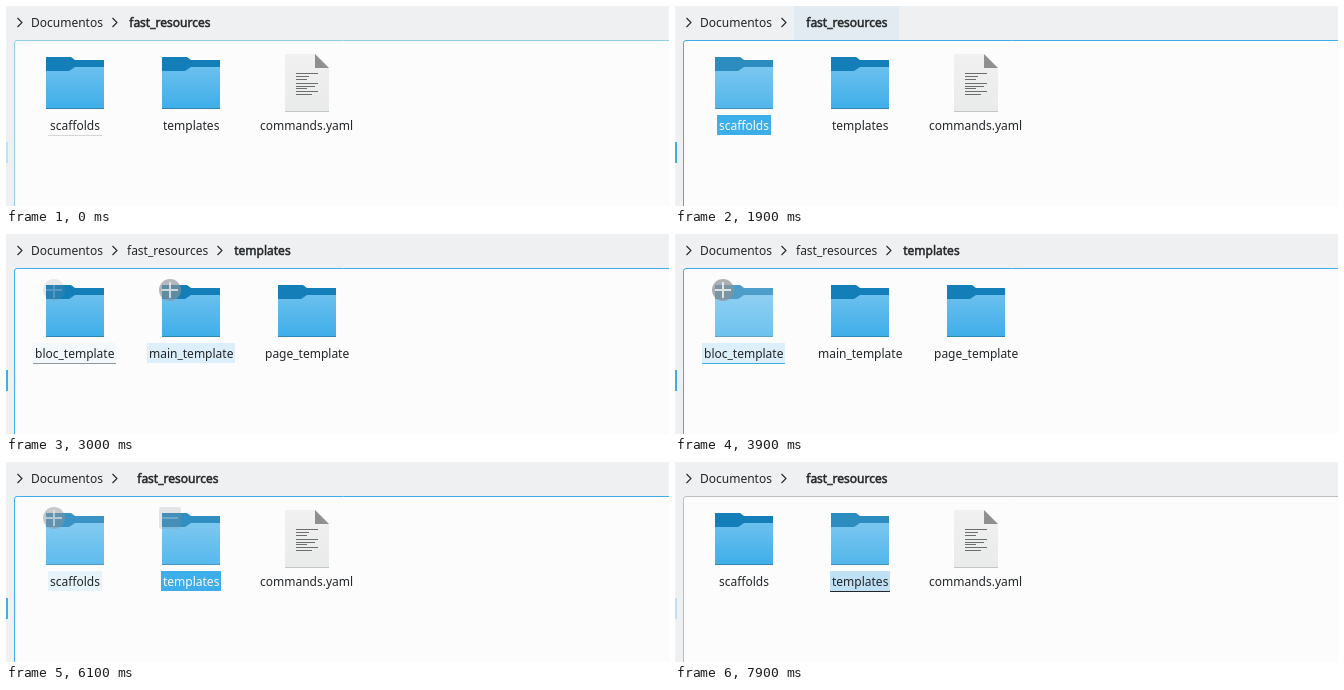
Recreate the animation shown at these times as an HTML page with a canvas. Size 663 px wide and 200 px high, loop 8 s.

```html
<!DOCTYPE html>
<html lang="es">
<head>
<meta charset="utf-8">
<title>File browser</title>
<style>
html, body { margin: 0; width: 100%; height: 100%; overflow: hidden; background: #eff0f1; }
canvas { display: block; width: 663px; height: 200px; }
</style>
</head>
<body>
<canvas id="stage" width="663" height="200"></canvas>
<script>
const ctx = document.getElementById('stage').getContext('2d');
const LOOP = 8000, STEP = 100;
const INK = '#232629', BLUE = '#3daee9';
const CENTERS = [69, 185, 301, 417];
const FONT = '12px "Noto Sans", "Open Sans", sans-serif';

const ramp = (t, a, b) => Math.min(1, Math.max(0, (t - a) / (b - a)));
const pulse = (t, a, b, c, d) => Math.min(ramp(t, a, b), 1 - ramp(t, c, d));
const mix = (a, b, k) => 'rgb(' + a.map((v, i) => Math.round(v + (b[i] - v) * k)) + ')';

function poly(points, fill) {
  ctx.beginPath();
  points.forEach(([x, y]) => ctx.lineTo(x, y));
  ctx.closePath();
  ctx.fillStyle = fill;
  ctx.fill();
}

function rect(x, y, w, h, fill) {
  ctx.fillStyle = fill;
  ctx.fillRect(x, y, w, h);
}

function gradient(y0, y1, from, to) {
  const g = ctx.createLinearGradient(0, y0, 0, y1);
  g.addColorStop(0, from);
  g.addColorStop(1, to);
  return g;
}

function folder(c, light) {
  const x = c - 29;
  const back = [[x, 51], [x + 25, 51], [x + 29, 54], [x + 58, 54], [x + 58, 103], [x, 103]];
  poly(back, '#147eb8');
  poly([[x, 65], [x + 23, 65], [x + 29, 61], [x + 58, 61], [x + 58, 103], [x, 103]],
    gradient(61, 103, '#6bc0ee', '#3eaee9'));
  rect(x, 102, 58, 1, '#2f86b5');
  if (light) poly(back, `rgba(255,255,255,${light})`);
}

function file(c, light) {
  const x = c - 22;
  const body = [[x, 48], [x + 30, 48], [x + 44, 62], [x + 44, 106], [x, 106]];
  poly(body, gradient(48, 106, '#f1f1f1', '#e9eaea'));
  rect(x, 105, 44, 1, '#c3c4c5');
  poly([[x + 30, 48], [x + 44, 62], [x + 30, 62]], '#8e8f91');
  const lines = [[67, 22], [70, 13], [73, 11], [77, 22], [80, 19], [82, 11], [85, 22], [88, 16]];
  lines.forEach(([y, w]) => rect(x + 11, y, w, 1, '#6b6d6f'));
  if (light) poly(body, `rgba(255,255,255,${light})`);
}

// Selection toggle: round plus, or square minus on selected items
function toggle(c, alpha, selected) {
  if (alpha <= 0) return;
  const x = c - 21, y = 56;
  ctx.save();
  ctx.globalAlpha = alpha;
  ctx.fillStyle = 'rgba(140,146,149,.72)';
  ctx.beginPath();
  if (selected) ctx.roundRect(x - 11, y - 11, 22, 22, 3);
  else ctx.arc(x, y, 11, 0, Math.PI * 2);
  ctx.fill();
  rect(x - 8, y - 1, 16, 2, 'rgba(240,241,242,.85)');
  if (!selected) {
    rect(x - 1, y - 8, 2, 7, 'rgba(240,241,242,.85)');
    rect(x - 1, y + 1, 2, 7, 'rgba(240,241,242,.85)');
  }
  ctx.restore();
}

function item(index, { name, hover = 0, glow = hover, mark = hover, selected, line }, active) {
  const c = CENTERS[index];
  const w = ctx.measureText(name).width;
  const x = Math.round(c - w / 2);
  const left = x - 2, width = Math.round(w) + 4;
  const light = Math.max(glow * 0.24, selected ? 0.1 : 0);
  (name.includes('.') ? file : folder)(c, light);
  toggle(c, mark, selected);
  if (selected) rect(left, 109, width, 20, active ? BLUE : '#c0e0f5');
  else if (hover) rect(left, 109, width, 20, `rgba(61,174,233,${0.17 * hover})`);
  if (line) rect(left, 129, width, 1, line);
  ctx.fillStyle = selected && active ? '#fcfcfc' : INK;
  ctx.fillText(name, x, 124);
}

function chevron(x, color = INK) {
  ctx.beginPath();
  ctx.moveTo(x - 2.5, 12);
  ctx.lineTo(x + 2, 16.5);
  ctx.lineTo(x - 2.5, 21);
  ctx.strokeStyle = color;
  ctx.lineWidth = 1.1;
  ctx.stroke();
}

function boldText(text, x, y) {
  ctx.lineWidth = 0.5;
  ctx.strokeStyle = ctx.fillStyle = INK;
  ctx.fillText(text, x + 0.25, y - 0.25);
  ctx.strokeText(text, x + 0.25, y - 0.25);
}

function breadcrumb(path, hover, indent) {
  const last = path.length - 1;
  if (hover) rect(119, 0, last === 1 ? 105 : 89, 34, `rgba(61,174,233,${0.07 * hover})`);
  chevron(14);
  let x = 25;
  path.forEach((name, i) => {
    if (i === last) return boldText(name, x + 2 + indent, 21);
    ctx.fillStyle = INK;
    ctx.fillText(name, x, 21);
    x += Math.round(ctx.measureText(name).width) + 12;
    chevron(x, i === 1 && hover ? mix([35, 38, 41], [130, 200, 238], hover) : INK);
    x += 12;
  });
}

const HOME = ['Documentos', 'fast_resources'];

function root(scaffolds, templates) {
  return [
    { name: 'scaffolds', ...scaffolds },
    { name: 'templates', ...templates },
    { name: 'commands.yaml' }
  ];
}

function scene(t) {
  if (t < 1300) {
    const hover = ramp(t, 600, 1000);
    return { path: HOME, items: root({ hover, line: hover > 0.5 ? BLUE : '#d4d6d8' }) };
  }
  if (t < 1900) return { path: [...HOME, 'scaffolds'], items: [] };
  if (t < 2700) {
    return {
      path: HOME, indent: 8, crumb: 1 - ramp(t, 2000, 2300),
      items: root({ selected: true }, { hover: ramp(t, 2100, 2500) })
    };
  }
  if (t < 4100) {
    const hover = ramp(t, 2900, 3300);
    return {
      path: [...HOME, 'templates'],
      items: [
        { name: 'bloc_template', hover, glow: ramp(t, 3600, 3900), line: hover > 0.5 ? BLUE : '#8d979f' },
        { name: 'main_template', hover: 1 - ramp(t, 3000, 3400), glow: 0, mark: 1 - ramp(t, 2950, 3400) },
        { name: 'page_template' }
      ]
    };
  }
  if (t < 5500) {
    return {
      path: [...HOME, 'templates', 'bloc_template'], crumb: ramp(t, 4900, 5200),
      items: [
        { name: '@name_bloc.dart', hover: pulse(t, 4100, 4500, 4500, 4800), line: '#92979b' },
        { name: '@name_event.dart', hover: pulse(t, 4600, 4800, 4800, 5000) },
        { name: '@name_state.dart', hover: pulse(t, 4700, 4900, 4900, 5200) },
        { name: 'template.yaml' }
      ]
    };
  }
  const shine = 0.15 * pulse(t, 6800, 7100, 7200, 7500);
  const hover = pulse(t, 5900, 6200, 6200, 6500);
  return {
    path: HOME, indent: 8, crumb: 1 - ramp(t, 5700, 6000),
    items: root(
      { hover, glow: hover + shine },
      {
        selected: true, hover: pulse(t, 5700, 6000, 6000, 6200),
        mark: 0.6 * pulse(t, 5700, 6000, 6000, 6200),
        line: t >= 7800 ? INK : null
      })
  };
}

function frameColor(t) {
  const bright = [61, 174, 233];
  if (t >= 7800) return mix(bright, [188, 191, 193], ramp(t, 7700, 7900));
  return mix([147, 206, 233], bright, ramp(t, 400, 700));
}

function draw(t) {
  const { path, items, crumb = 0, indent = 0 } = scene(t);
  const active = t >= 500 && t < 7800;
  ctx.font = FONT;
  rect(0, 0, 663, 200, '#eff0f1');
  breadcrumb(path, crumb, indent);
  ctx.beginPath();
  ctx.roundRect(8.5, 34.5, 680, 190, 2.5);
  ctx.fillStyle = '#fcfcfc';
  ctx.fill();
  ctx.lineWidth = 1;
  ctx.strokeStyle = frameColor(t);
  ctx.stroke();
  rect(0, 136, 2, 21, active ? BLUE : '#c0e0f5');
  items.forEach((it, i) => item(i, it, active));
}

function tick() {
  draw(Math.floor(performance.now() % LOOP / STEP) * STEP);
  requestAnimationFrame(tick);
}
tick();
</script>
</body>
</html>
```
